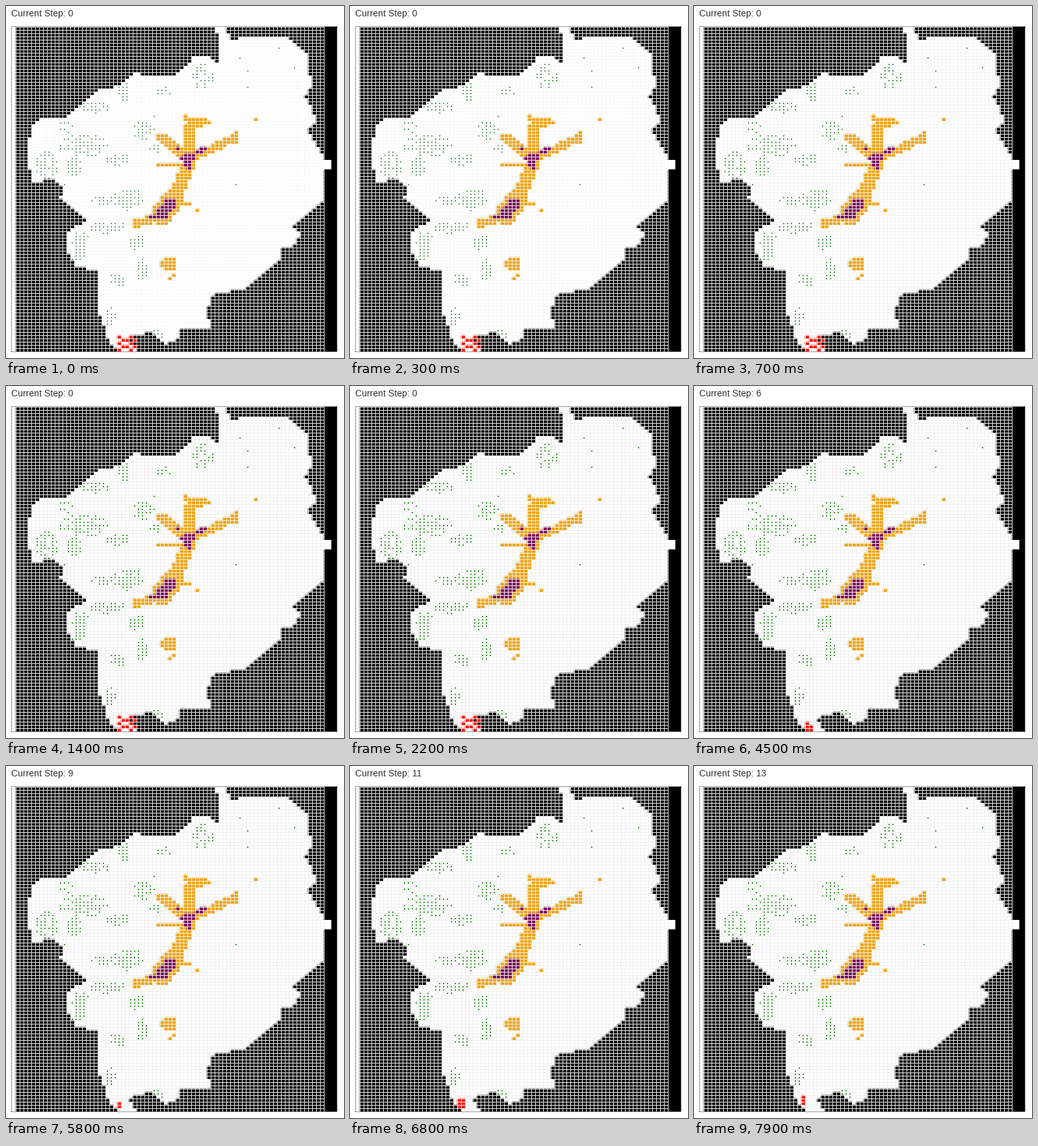
Animation of 520x542 px, one loop 8000 ms. Source, as a matplotlib script:

```python
import numpy as np
import matplotlib.pyplot as plt
from matplotlib.animation import FuncAnimation
from matplotlib.colors import to_rgb
from matplotlib.path import Path

W, H, DPI = 520, 542, 128
X0, Y0, CW, CH = 9, 32, 6, 5          # canvas origin and cell size
COLS, ROWS, GRID_COLS, SIDE = 84, 100, 80, 500
FRAMES, INTERVAL = 80, 100

INK, LINE, LEAF, ORANGE, PURPLE, RED = map(np.array, map(to_rgb, (
    "#333333", "#eeeeee", "#35902c", "#f2a50c", "#7c0a5c", "#fb1a12")))
PALE_LEAF = np.array(to_rgb("#6d9a76"))

# Key points of the coast, clockwise, in pixels
COAST = [(33, 232), (33, 215), (40, 185), (57, 172), (93, 172), (118, 150),
         (140, 130), (175, 122), (198, 104), (250, 107), (265, 103),
         (290, 77), (318, 80), (327, 87), (327, 53), (321, 32), (339, 32),
         (346, 52), (384, 45), (435, 47), (463, 75), (471, 125), (459, 140),
         (471, 153), (477, 180), (465, 190), (483, 220), (489, 237),
         (501, 237), (501, 252), (489, 252), (489, 297), (441, 340),
         (453, 350), (447, 368), (423, 372), (423, 390), (363, 437),
         (321, 442), (309, 470), (315, 497), (267, 497), (267, 512),
         (243, 521), (219, 502), (190, 512), (201, 532), (171, 532),
         (158, 515), (141, 470), (140, 410), (105, 400), (94, 375),
         (93, 347), (122, 330), (82, 297), (88, 280), (70, 267), (39, 272)]

# Streets of the town: x0, y0, x1, y1, half width
STREETS = [(282, 190, 280, 235, 9), (289, 180, 307, 178, 6),
           (275, 170, 282, 180, 4), (240, 203, 272, 228, 7),
           (234, 244, 275, 244, 3), (285, 235, 354, 201, 6),
           (354, 196, 354, 208, 3), (282, 238, 261, 290, 10),
           (255, 301, 239, 320, 17), (235, 326, 198, 335, 6),
           (265, 305, 283, 305, 4), (250, 398, 252, 398, 11),
           (252, 420, 258, 415, 3), (384, 174, 384, 175, 3),
           (294, 314, 294, 315, 3)]
CENTRE = [(273, 233, 287, 233, 4), (279, 239, 281, 246, 5),
          (294, 225, 306, 220, 4), (255, 303, 240, 318, 9),
          (222, 325, 242, 323, 4), (264, 219, 264, 220, 3)]

# Groves: centre and radii
GROVES = [(302, 108, 17, 20), (180, 133, 12, 18), (132, 156, 27, 10),
          (248, 131, 17, 8), (92, 184, 12, 12), (212, 192, 19, 14),
          (120, 214, 38, 18), (62, 243, 20, 22), (105, 247, 16, 17),
          (174, 237, 20, 12), (230, 218, 11, 8), (190, 298, 26, 17),
          (150, 298, 20, 7), (115, 358, 17, 10), (160, 341, 32, 11),
          (110, 380, 13, 20), (200, 364, 15, 14), (208, 406, 11, 20),
          (170, 422, 15, 11), (160, 478, 9, 14), (234, 503, 11, 8)]
LONE_TREES = [(420, 64), (444, 94), (372, 124), (362, 78), (369, 100),
              (228, 169), (88, 274), (354, 274)]

# Block holding the walkers: step, column, row, width, height
BLOCKS = np.array([(0, 27, 95, 5, 5), (3, 27, 98, 2, 2),
                   (9, 27, 97, 1, 2), (13, 26, 95, 1, 3)])
WALKERS = 12

CX, CY = np.meshgrid(X0 + (np.arange(COLS) + .5) * CW,
                     Y0 + (np.arange(ROWS) + .5) * CH)


def near(strokes):
    """Cells whose centre lies on one of the thick strokes."""
    mask = np.zeros(CX.shape, bool)
    for x0, y0, x1, y1, half in strokes:
        dx, dy = x1 - x0, y1 - y0
        k = ((CX - x0) * dx + (CY - y0) * dy) / (dx * dx + dy * dy)
        k = np.clip(k, 0, 1)
        mask |= np.hypot(CX - x0 - k * dx, CY - y0 - k * dy) <= half
    return mask


def woods():
    rng = np.random.default_rng(4)
    mask = np.zeros(CX.shape, bool)
    for x, y, rx, ry in GROVES:
        d = ((CX - x) / rx) ** 2 + ((CY - y) / ry) ** 2
        mask |= (d <= 1) & (rng.random(d.shape) < .92 - .45 * d)
    for x, y in LONE_TREES:
        mask[(y - Y0) // CH, (x - X0) // CW] = True
    return mask & LAND


def paint(area, mask, color):
    """Fill cells; their outline spills half a pixel up and to the left."""
    big = np.kron(mask, np.ones((CH, CW), bool))[:, :SIDE]
    edge = big.copy()
    edge[:, :-1] |= big[:, 1:]
    edge[:-1] |= big[1:]
    edge &= ~big
    area[edge] = (area[edge] + color) / 2
    area[big] = color


def draw_grid(area, strength):
    """Grid lines; over land they start out faint."""
    lines = np.zeros((SIDE, SIDE), bool)
    lines[:, :GRID_COLS * CW + 1:CW] = True
    lines[::CH, :GRID_COLS * CW] = True
    bare = area.min(axis=2) > .9
    area[lines & ~bare] = LINE
    area[lines & bare] = 1 - (1 - LINE) * strength


LAND = Path(COAST).contains_points(
    np.c_[CX.ravel(), CY.ravel()]).reshape(CX.shape)
SEA = ~LAND
SEA[:, 0] = False
TOWN, CORE, TREES = near(STREETS), near(CENTRE), woods()


def walkers(step):
    col, row, w, h = (np.interp(step, BLOCKS[:, 0], b) for b in BLOCKS.T[1:])
    i = np.arange(WALKERS)
    mask = np.zeros(CX.shape, bool)
    mask[(row + (i + .5) / WALKERS * h).astype(int),
         (col + i * .618 % 1 * w).astype(int)] = True
    return mask


def draw_stage(step, clear):
    img = np.ones((H, W, 3))
    area = img[Y0:Y0 + SIDE, X0:X0 + SIDE]
    for mask, color in ((SEA, 0), (TOWN, ORANGE), (CORE, PURPLE),
                        (walkers(step), RED)):
        paint(area, mask, color)
    draw_grid(area, .3 + .7 * clear)

    leaf = PALE_LEAF + (LEAF - PALE_LEAF) * clear
    free = TREES & ~TOWN & ~CORE
    for r, c in np.argwhere(free):
        area[r * CH + 2:r * CH + 4, c * CW + 2:c * CW + 4] = leaf

    # dotted frame
    for near_side, far_side in ((Y0 - 1, X0 - 1), (Y0 + SIDE, X0 + SIDE)):
        img[near_side, X0 - 1:X0 + SIDE + 1:2] = INK
        img[Y0 - 1:Y0 + SIDE + 1:2, far_side] = INK
    return img


fig = plt.figure(figsize=(W / DPI, H / DPI), dpi=DPI)
ax = fig.add_axes([0, 0, 1, 1])
ax.axis("off")
picture = ax.imshow(np.ones((H, W, 3)), extent=(0, W, H, 0),
                    interpolation="nearest", aspect="auto")
label = ax.text(8, 16, "", fontsize=14 * 72 / DPI, family="Liberation Sans",
                color=INK, va="baseline")


def update(i):
    t = i * INTERVAL
    step = max(0, (t - 1910) // 430)
    picture.set_data(draw_stage(step, min(1, t / 1400)))
    label.set_text(f"Current Step: {step}")
    return picture, label


anim = FuncAnimation(fig, update, frames=FRAMES, interval=INTERVAL,
                     repeat=True, repeat_delay=0)
plt.show()
```
